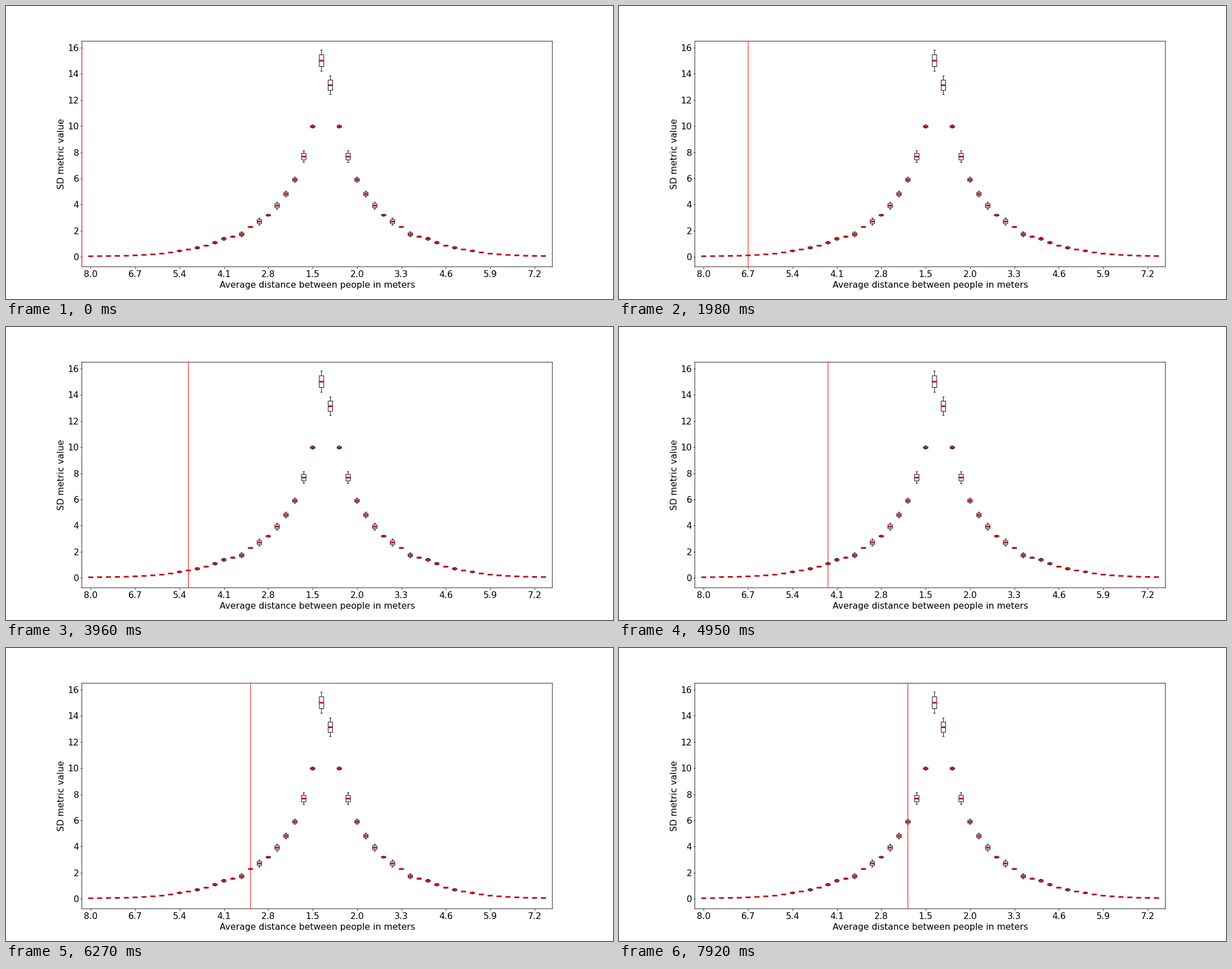
A matplotlib script for the animation above (8 s loop, 1077 px wide and 520 px high).

```python
import matplotlib.pyplot as plt
import numpy as np
from matplotlib.animation import FuncAnimation
from matplotlib.collections import LineCollection

W, H, DPI = 1077, 520, 72
LOOP, TICK, STEP = 8000, 20, 330  # ms
INK, MEDIAN, CURSOR = "#101010", "#c0161c", "#f81010"
HALF = 27  # positions up to the peak; as many follow, less the last two
COUNT = 52

plt.rcParams.update({"font.family": "DejaVu Sans", "font.size": 15.65,
                     "path.snap": False})


def distance(x):
    """People approach up to the peak, then move apart again."""
    return 8 - 0.26 * (x - 1) if x <= HALF else 1.22 + 0.26 * (x - HALF - 1)


def steps_from_peak(x):
    return HALF - x if x <= HALF else x - HALF - 1


def median(x):
    """Log-linear decay through a few key points; the far side peaks lower."""
    keys = [0, 1, 3, 6, 8, 9, 11, 13, 16, 18, 22, 26]
    values = [15, 9.97, 5.9, 3.19, 2.29, 1.73, 1.38, 0.86, 0.46, 0.25, 0.09, 0.05]
    k = steps_from_peak(x)
    value = np.exp(np.interp(k, keys, np.log(values)))
    return value * 0.875 if x == HALF + 1 else value


def box_range(x):
    """Interquartile range: a wavy share of the median that grows outwards."""
    k = steps_from_peak(x)
    return median(x) * 0.025 * (1 + k / 8) * (1.4 + np.cos(2 * np.pi * k / 2.3))


def box_lines(x):
    """Box, whiskers and caps of one box plot as polylines."""
    med, iqr = median(x), box_range(x)
    l, r = x - 0.25, x + 0.25
    q1, q3 = med - iqr / 2, med + iqr / 2
    lines = [[(l, q1), (r, q1), (r, q3), (l, q3), (l, q1)]]
    for edge, end in ((q1, q1 - 0.4 * iqr), (q3, q3 + 0.4 * iqr)):
        lines.append([(x, edge), (x, end)])
        lines.append([(x - 0.125, end), (x + 0.125, end)])
    return lines


fig = plt.figure(figsize=(W / DPI, H / DPI), dpi=DPI, facecolor="white")
ax = fig.add_axes([0.125, 0.11, 0.775, 0.77])
ax.set_xlim(0, COUNT + 1)
ax.set_ylim(-0.754, 16.494)

positions = range(1, COUNT + 1)
outlines = [line for x in positions for line in box_lines(x)]
bars = [[(x - 0.28, median(x)), (x + 0.28, median(x))] for x in positions]
ax.add_collection(LineCollection(outlines, colors=INK, linewidths=1), autolim=False)
ax.add_collection(LineCollection(bars, colors=MEDIAN, linewidths=3, zorder=2.2),
                  autolim=False)

marks = range(1, COUNT + 1, 5)
ax.set_xticks(marks, [f"{distance(x):.1f}" for x in marks])
ax.set_yticks(range(0, 17, 2))
ax.tick_params(length=2.6, width=0.85, pad=2.6)
ax.tick_params(axis="x", pad=3.5)
ax.set_xlabel("Average distance between people in meters", labelpad=3.8)
ax.set_ylabel("SD metric value", labelpad=3)
for spine in ax.spines.values():
    spine.set(linewidth=0.9, edgecolor=INK)

cursor = ax.axvline(0, color=CURSOR, linewidth=1.1, zorder=3, clip_on=False)


def update(i):
    # Half a tick ahead, so that no step comes late.
    x = (i * TICK + TICK // 2) // STEP
    cursor.set_xdata([x, x])
    return (cursor,)


anim = FuncAnimation(fig, update, frames=LOOP // TICK, interval=TICK,
                     repeat=True, repeat_delay=0, blit=False)
plt.show()
```
